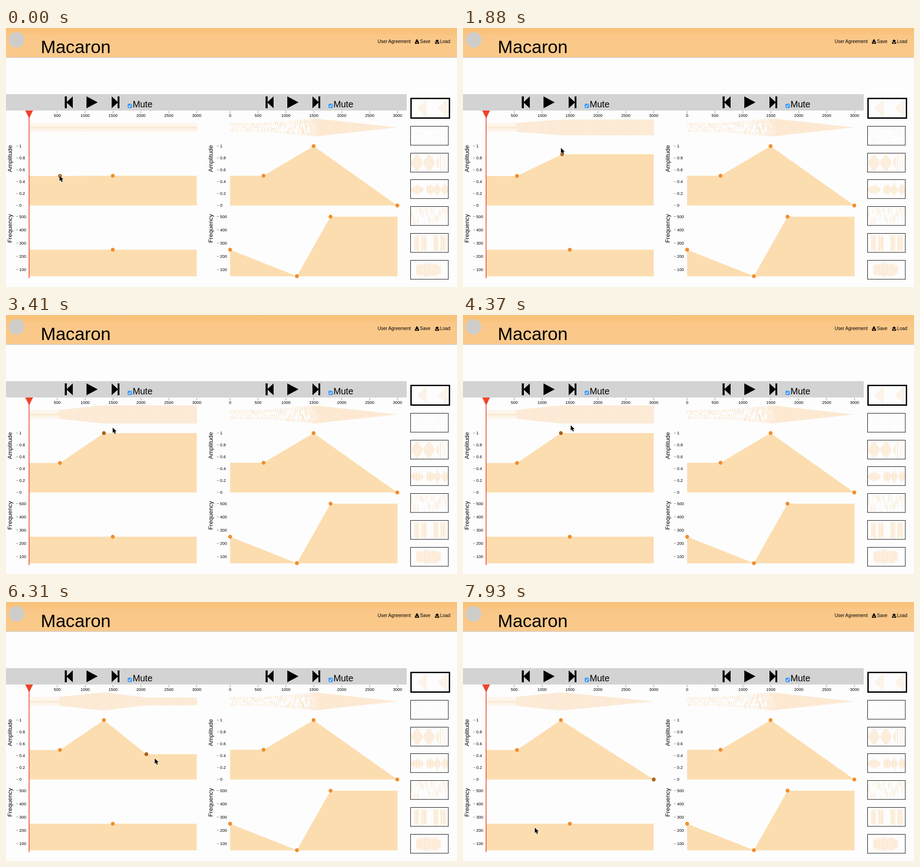
Write an HTML page that moves like this. It is 986 by 568 pixels and loops after 7.99 s.

```html
<!DOCTYPE html>
<html lang="en">
<head>
<meta charset="utf-8">
<title>Macaron</title>
<style>
html, body { margin: 0; width: 100%; height: 100%; overflow: hidden; background: #fdfdfd; }
svg { display: block; font-family: "Liberation Sans", Arial, sans-serif; }
.small { font-size: 9px; }
.area { fill: #fcddb0; }
.tick { stroke: #888; fill: none; }
.wave { stroke: #fbe0be; fill: none; }
.pale { stroke: #fce8d0; fill: none; }
.tint { fill: #fde9d2; }
.dot { fill: #f28d2c; }
.dot.on { fill: #a9631b; }
</style>
</head>
<body>
<svg id="stage" width="986" height="568" viewBox="0 0 986 568">
  <defs>
    <linearGradient id="head" x2="0" y2="1">
      <stop offset="0" stop-color="#f9c179"/>
      <stop offset=".22" stop-color="#f9c47f"/>
      <stop offset=".24" stop-color="#fac788"/>
      <stop offset="1" stop-color="#fac98a"/>
    </linearGradient>
    <linearGradient id="fade">
      <stop offset="0" stop-color="#fde9d2" stop-opacity=".35"/>
      <stop offset=".12" stop-color="#fde9d2"/>
    </linearGradient>
  </defs>
  <rect width="986" height="568" fill="#fdfdfd"/>
  <rect width="986" height="64" fill="url(#head)"/>
  <path d="M0 64.700H986" stroke="#d0cdc9" stroke-width="1.500"/>
  <circle cx="23" cy="26" r="17" fill="#cfcdca"/>
  <text x="76" y="55" font-size="39.300">Macaron</text>
  <g font-size="10">
    <text x="812.500" y="33">User Agreement</text>
    <text x="905" y="33">Save</text>
    <text x="949" y="33">Load</text>
  </g>
  <path d="M897 25h3v3h3l-4.500 4-4.500-4h3zM894 30.500h1.500l3 3 3-3h1.500v4h-9z"/>
  <path d="M941 32h3v-3h3l-4.500-4-4.500 4h3zM938 30.500h2v2.500h5v-2.500h2v4h-9z"/>
  <rect y="145" width="876" height="36" fill="#d3d3d3"/>
  <g id="panels"></g>
  <g id="thumbs"></g>
  <path id="area" class="area"/>
  <path id="tint" class="tint" opacity=".65"/>
  <path id="wave" class="wave" stroke-width=".9"/>
  <g id="nodes"></g>
  <path d="M50.500 195V548.500" stroke="#ee432f" stroke-width="1.700"/>
  <path d="M42 181H59L50.500 198Z" fill="#f0432c"/>
  <g id="cursor">
    <path transform="scale(.88)" d="M0 0V13.200L3 10.400 5.300 15.500 7.700 14.500 5.500 9.500H9.700Z" stroke="#fff" stroke-width="1.400" paint-order="stroke"/>
  </g>
</svg>
<script>
const $ = id => document.getElementById(id);
const LOOP = 7990, LEFT = 51, RIGHT = 417, MID = 218, TOP = 259, FLOOR = 389.3;
const clamp = (v, lo, hi) => Math.max(lo, Math.min(hi, v));
const smooth = u => u * u * (3 - 2 * u);
const mix = (a, b, u) => a + (b - a) * u;
const noise = n => { const v = Math.sin(n * 127.1 + 31.7) * 43758.5453; return v - Math.floor(v); };
const poly = pts => 'M' + pts.map(p => p.join(' ')).join('L') + 'Z';
const line = (x, a, b, slant = 0, mid = MID) =>
  `M${x.toFixed(2)} ${(mid + a).toFixed(2)}L${(x + slant).toFixed(2)} ${(mid + b).toFixed(2)}`;
const text = (x, y, s, more = '') => `<text x="${x}" y="${y}" ${more}>${s}</text>`;

// half height of the waveform at x, from the amplitude curve
function loud(env, x) {
  const i = clamp(env.findIndex(p => p[0] >= x), 1, env.length - 1);
  const [x0, y0] = env[i - 1], [x1, y1] = env[i];
  return (FLOOR - mix(y0, y1, (x - x0) / (x1 - x0 || 1))) / (FLOOR - TOP) * 20;
}

// Static parts

function panel(dx) {
  let s = '<path d="M128.500 150H133V162L146 150V176L133 164V176H128.500ZM176 150L200.500 163 176 176ZM231 150L244 162V150H248V176H244V164L231 176Z"/>';
  s += '<rect x="266" y="166" width="9.500" height="9.500" rx="2" fill="#3b99fc"/><path d="M268 170.800L270 173 273.500 168" fill="none" stroke="#fff" stroke-width="1.300"/>';
  s += text(277, 174, 'Mute', 'font-size="19.500"') + '<g class="small">';
  for (let k = 0; k <= 6; k++) {
    const x = LEFT + k * 61;
    s += `<path class="tick" d="M${x} 182V187"/>` + text(x, 195, k * 500, 'text-anchor="middle"');
  }
  const mark = (y, label) => `<path class="tick" d="M22 ${y}H26.500"/>` + text(29, y + 3, label);
  for (let k = 0; k <= 5; k++) s += mark(389 - k * 26, k * 2 / 10);
  for (let k = 1; k <= 5; k++) s += mark(559 - k * 29.1, k * 100);
  const side = (y, label) => text(0, 0, label, `font-size="13.300" transform="translate(12.800 ${y}) rotate(-90)"`);
  return `<g transform="translate(${dx})">${s}</g>${side(316, 'Amplitude')}${side(471, 'Frequency')}</g>`;
}

const dots = pts => pts.map(p => `<circle class="dot" cx="${p[0]}" cy="${p[1]}" r="4.200"/>`).join('');

// curve through pts, held level to both ends and filled down to the floor
function curve(pts, from, to, floor) {
  const all = [[from, pts[0][1]], ...pts, [to, pts[pts.length - 1][1]], [to, floor], [from, floor]];
  return `<path class="area" d="${poly(all)}"/>` + dots(pts);
}

function rightWave(env) {
  let d = '';
  for (let x = 490, i = 0; x < 690; i++) {
    const a = loud(env, x), u = noise(i) * 1.5 - 1;
    d += line(x, u * a, Math.min(1, u + .3 + noise(i + 300) * .6) * a, 1);
    if (i % 2) d += line(x + 1, -a, -a * .5, .6) + line(x + 1.4, a * .6, a, .6);
    x += x < 640 ? 2.4 : 1.6;
  }
  return `<path class="wave" d="${d}"/><path fill="url(#fade)" d="M664 202.500L672.500 198 855.500 218 672.500 238 664 233.500Z"/>`;
}

const rightAmp = [[563, 324], [672.5, TOP], [855.5, FLOOR]];
$('panels').innerHTML = panel(0) + panel(439)
  + curve([[233.5, 486.3]], LEFT, RIGHT, 544.5)
  + rightWave([[490, 324], ...rightAmp])
  + curve(rightAmp, 490, 855.5, FLOOR)
  + curve([[490, 486.3], [636, 544.3], [709.5, 413.7]], 490, 856, 544.5);

// Previews: height at x (0..83) as a share of the half height
const bump = (x, mid, half) => Math.max(0, 1 - Math.abs(x - mid) / half);
const inside = (x, mid, half) => bump(x, mid, half) > 0;
const round = (x, mid, half) => Math.sqrt(bump(x, mid, half));
const previews = [
  { gap: 2.1, h: x => inside(x % 44, 25, 10) ? (x % 44 - 15) / 20 : 0 },
  { gap: 2.6, loose: .08, h: x => Math.abs(x - 37) > 7 ? .85 : 0 },
  { gap: 1.3, h: x => round(x, 14, 13) ** 1.5 + round(x, 40, 13) ** 1.5 + (noise(x) > .6 ? round(x, 68, 12) : 0) },
  { gap: 1.2, h: x => (.65 * round(x, 14, 15) + .9 * (round(x, 43, 9) + round(x, 59, 7) + round(x, 75, 7))) * mix(.5, 1, noise(x)) },
  { gap: 2.2, loose: .4, h: x => .98 },
  { gap: 1.2, h: x => inside(x % 42, 13, 5) || inside(x % 42, 29, 6) ? mix(.65, 1, noise(x)) : 0 },
  { gap: 1.2, h: x => inside(x, 39, 27) ? mix(.4, .85, round(x, 39, 28)) * mix(.7, 1.1, noise(x)) : 0 }
];
$('thumbs').innerHTML = previews.map((p, k) => {
  const mid = k ? 237 + (k - 1) * 58.7 : 176;
  let d = '';
  for (let x = 1, i = 0; x < 82; x += p.gap, i++) {
    const a = p.h(x) * 19.5;
    const c = p.loose ? (noise(i + k * 50) * 2 - 1) * a : 0, r = a * (p.loose || 1);
    if (a) d += line(884.5 + x, Math.max(-a, c - r), Math.min(a, c + r), p.loose ? .6 : 0, mid);
  }
  const box = k ? `x="884.500" y="${Math.round(mid - 21) - .5}" width="82.500" height="41.500"`
    : 'x="885.500" y="154.500" width="84" height="43" stroke-width="3"';
  return `<path class="pale" d="${d}"/><rect ${box} fill="none" stroke="#000"/>`;
}).join('');

// Motion

// pointer moves: start, end, target
const moves = [
  [460, 1240, 235, 322], [1430, 1880, 214, 263], [1880, 2160, 215.5, 247],
  [3360, 3460, 250, 247], [3460, 3800, 161, 207], [3800, 4200, 226, 231],
  [4200, 4990, 305, 321], [5000, 5450, 302.5, 331.5],
  [6090, 6890, 424, 394], [6890, 7410, 428, 401], [7530, 7930, 157, 495]
];

function pointer(t) {
  let x = 117, y = 324;
  for (const [from, to, tx, ty] of moves) {
    const u = smooth(clamp((t - from) / (to - from), 0, 1));
    x = mix(x, tx, u);
    y = mix(y, ty, u);
  }
  return [x, y];
}

// a dragged node trails the pointer and stays inside the chart
function dragged(t, release, dx, dy) {
  const [x, y] = pointer(Math.min(t - 130, release));
  return [clamp(x + dx, LEFT, RIGHT), clamp(y + dy, TOP, FLOOR)];
}

const GRAB = 1480, DESELECT = 5450, ADD = 5560;

function draw(t) {
  const nodes = [[118, 324.5], dragged(clamp(t, GRAB, LOOP), 2600, -1.5, 2)];
  if (t >= ADD) nodes.push(dragged(t, 7500, 0, 0));
  const active = t < GRAB ? 0 : t < DESELECT ? 1 : 2;
  $('nodes').innerHTML = dots(nodes);
  $('nodes').children[active]?.classList.add('on');

  const env = [[LEFT, nodes[0][1]], ...nodes, [RIGHT, nodes[nodes.length - 1][1]]];
  $('area').setAttribute('d', poly([...env, [RIGHT, FLOOR], [LEFT, FLOOR]]));

  // coarse, aliased strokes first, then even stripes on a tint
  const split = t < GRAB ? RIGHT : nodes[0][0];
  let d = `M${LEFT} ${MID}H${split}`;
  for (let x = LEFT, i = 0; x < split; x += 1.83, i++) {
    const a = loud(env, x);
    d += i % 2 ? line(x, -a * .2, a) : line(x, -a, a * .4);
  }
  for (let x = split; x < RIGHT; x += 3.05) {
    const a = loud(env, x);
    d += line(x, -a, a);
  }
  $('wave').setAttribute('d', d);
  const edge = env.filter(p => p[0] >= split).map(([x]) => [x, loud(env, x)]);
  const upper = edge.map(([x, a]) => [x, MID - a]), lower = edge.map(([x, a]) => [x, MID + a]);
  $('tint').setAttribute('d', poly([...upper, ...lower.reverse()]));

  $('cursor').setAttribute('transform', `translate(${pointer(t).join(' ')})`);
}

function tick() {
  draw(performance.now() % LOOP);
  requestAnimationFrame(tick);
}
tick();
</script>
</body>
</html>
```
